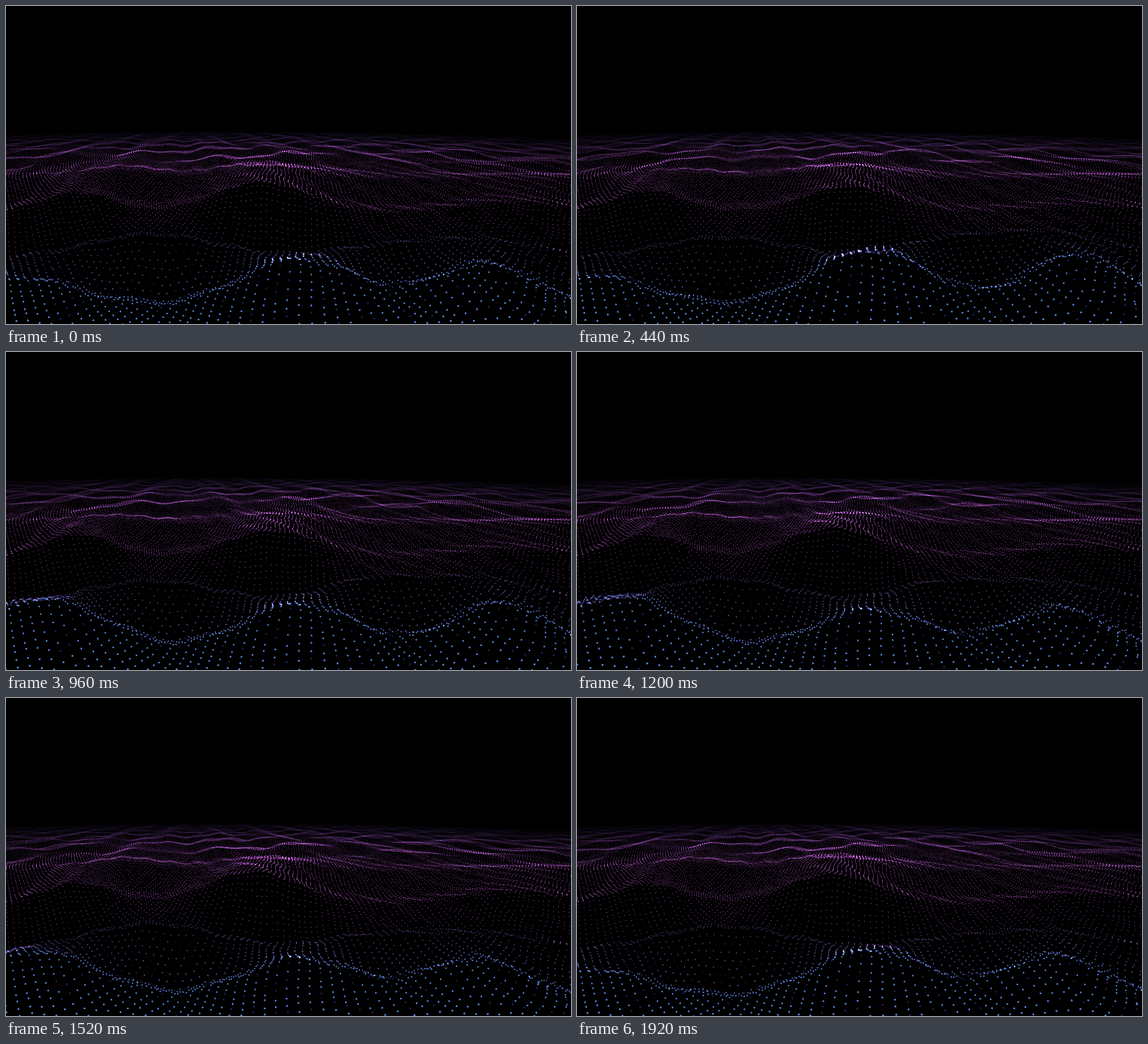
Animation of 750 by 422 pixels, one loop 1960 ms. Source, as an HTML page with a canvas:

```html
<!DOCTYPE html>
<html lang="en">
<head>
<meta charset="utf-8">
<title>Particle waves</title>
<style>
  html, body { margin: 0; width: 100%; height: 100%; overflow: hidden; background: #000; }
  canvas { display: block; width: 750px; height: 422px; }
</style>
</head>
<body>
<canvas id="stage" width="750" height="422"></canvas>
<script>
const W = 750, H = 422, STEP = 40, FRAMES = 49, CYCLE = 1920;
const FOCAL = 296, CAM = 15, NEAR = 15, FAR = 290, OPEN = 85;
const ctx = document.getElementById('stage').getContext('2d');
const image = ctx.createImageData(W, H);
const light = new Float32Array(W * H * 3);

// A hill breathes once per loop: lowest and furthest left at time `low`.
const hill = (x, width, rise, swing, drift, low) => ({ x, width, rise, swing, drift, low });

// Wave crests from front to back; `lip` is the thickness of the dense band on top.
const ridges = [
  { z: 23, end: 27, base: 402, lip: 6, hills: [
    hill(30, 120, 57, 20, 25, 200), hill(390, 110, 66, 11, 0, 1450), hill(645, 95, 63, 9, 22, 1600)] },
  { z: 33, end: 36, base: 336, lip: 4, hills: [
    hill(195, 120, 32, 4, 0, 500), hill(470, 80, 15, 8, 0, 0), hill(610, 130, 32, 8, 0, 1650)] },
  { z: 44, end: 51, base: 273, lip: 9, hills: [
    hill(95, 65, 29, 3, 0, 0), hill(345, 85, 38, 5, -18, 600), hill(670, 90, 14, 4, 0, 500)] },
  { z: 62, end: 68, base: 228, lip: 6, hills: [
    hill(150, 60, 9, 3, 10, 700), hill(350, 70, 13, 4, -10, 1000)] }
];

const mix = (a, b, k) => a + (b - a) * k;
const ramp = (v, a, b) => Math.max(0, Math.min(1, (v - a) / (b - a)));
const hash = (a, b) => {
  const v = Math.sin(a * 127.1 + b * 311.7) * 43758.5453;
  return v - Math.floor(v);
};

function crest({ base, hills }, time) {
  const line = new Float32Array(W + 1).fill(base);
  for (const { x, width, rise, swing, drift, low } of hills) {
    const c = Math.cos((time - low) / CYCLE * Math.PI * 2);
    for (let i = 0; i <= W; i++) {
      line[i] -= (rise - swing * c) * Math.exp(-(((i - x + drift * c) / width) ** 2));
    }
  }
  return line;
}

// Depths at which the sheet follows a crest line.
function knots(time) {
  const list = [{ z: NEAR, line: new Float32Array(W + 1).fill(455), up: 0 }];
  for (const ridge of ridges) {
    const line = crest(ridge, time);
    list.push({ z: ridge.z, line, up: 0 }, { z: ridge.end, line, up: ridge.lip });
  }
  return list;
}

function swell(x, z, p) {
  return .8 * Math.sin(.19 * x + .07 * z + 1 + .8 * Math.sin(p))
    + .7 * Math.sin(.21 * z - .06 * x + .9 * Math.cos(p))
    + .6 * Math.sin(.11 * x - .14 * z + 2 + .7 * Math.sin(p + 2))
    + .4 * Math.sin(.37 * x + .2 * z + Math.cos(p + 1));
}

// Open water far away; its edge sinks towards both sides.
function plain(x, gx, z, p) {
  const horizon = 152 + 9 * ((x - 280) / 470) ** 2;
  return horizon + (CAM - swell(gx, z, p)) * FOCAL / z;
}

const BLUE = [90, 142, 240], PURPLE = [192, 98, 212], DUSK = [70, 48, 120];

function tone(z) {
  const warm = ramp(z, 23, 40), dark = ramp(z, 50, 240);
  const dip = 1 - .4 * Math.exp(-(((z - 34) / 6) ** 2));
  return BLUE.map((v, i) => dip * mix(mix(v, PURPLE[i], warm), DUSK[i], dark));
}

function dot(x, y, r, red, green, blue) {
  const reach = r + .5;
  const x0 = Math.max(0, Math.ceil(x - reach)), x1 = Math.min(W - 1, Math.floor(x + reach));
  const y0 = Math.max(0, Math.ceil(y - reach)), y1 = Math.min(H - 1, Math.floor(y + reach));
  for (let py = y0; py <= y1; py++) {
    for (let px = x0; px <= x1; px++) {
      const cover = Math.min(1, reach - Math.sqrt((px - x) ** 2 + (py - y) ** 2));
      if (cover <= 0) continue;
      const i = (py * W + px) * 3;
      light[i] += red * cover;
      light[i + 1] += green * cover;
      light[i + 2] += blue * cover;
    }
  }
}

function draw(time) {
  const p = time / CYCLE * Math.PI * 2;
  const sheet = knots(time);
  light.fill(0);
  for (let z = NEAR, row = 0; z < FAR; z += .75 * Math.max(1, z / 60), row++) {
    const scale = FOCAL / z, half = Math.ceil(W / 2 / scale) + 1;
    const [r, g, b] = tone(z);
    const size = Math.max(.5, 22 / z);
    const n = sheet.findLastIndex(k => k.z <= z);
    const from = sheet[n], to = sheet[n + 1];
    const k = ramp(z, from.z, to ? to.z : OPEN);
    for (let col = -half; col <= half; col++) {
      const gx = col + .2 * Math.sin(z * .6 + col * .35 + Math.sin(p));
      const x = W / 2 + gx * scale;
      if (x < -2 || x > W + 2) continue;
      const i = Math.round(ramp(x, 0, W) * W);
      let y = to ? mix(from.line[i] - from.up, to.line[i] - to.up, k)
        : mix(from.line[i] - from.up, plain(x, gx, z, p), k);
      const seed = hash(col, row);
      if (z < OPEN) {
        y += scale * (.2 * Math.sin(gx * .8 + z * .5 + Math.sin(p)) + .25 * (seed - .5));
      }
      if (y > H + 2) continue;
      const u = gx / z;
      const fog = Math.min(1, 1.4 * Math.exp(-z * (1 + .12 * u * u) / 70));
      const faint = seed < .2;
      const a = fog * (faint ? .4 : 1);
      dot(x, y, size, r * a, g * a * (faint ? .6 : 1), b * a);
    }
  }
  const out = image.data;
  for (let i = 0, j = 0; i < out.length; i += 4, j += 3) {
    out[i] = light[j];
    out[i + 1] = light[j + 1];
    out[i + 2] = light[j + 2];
    out[i + 3] = 255;
  }
  ctx.putImageData(image, 0, 0);
}

const start = performance.now();
let shown = -1;
function tick() {
  const frame = Math.floor((performance.now() - start) / STEP) % FRAMES;
  if (frame !== shown) {
    shown = frame;
    draw(frame * STEP % CYCLE);
  }
  requestAnimationFrame(tick);
}
tick();
</script>
</body>
</html>
```
